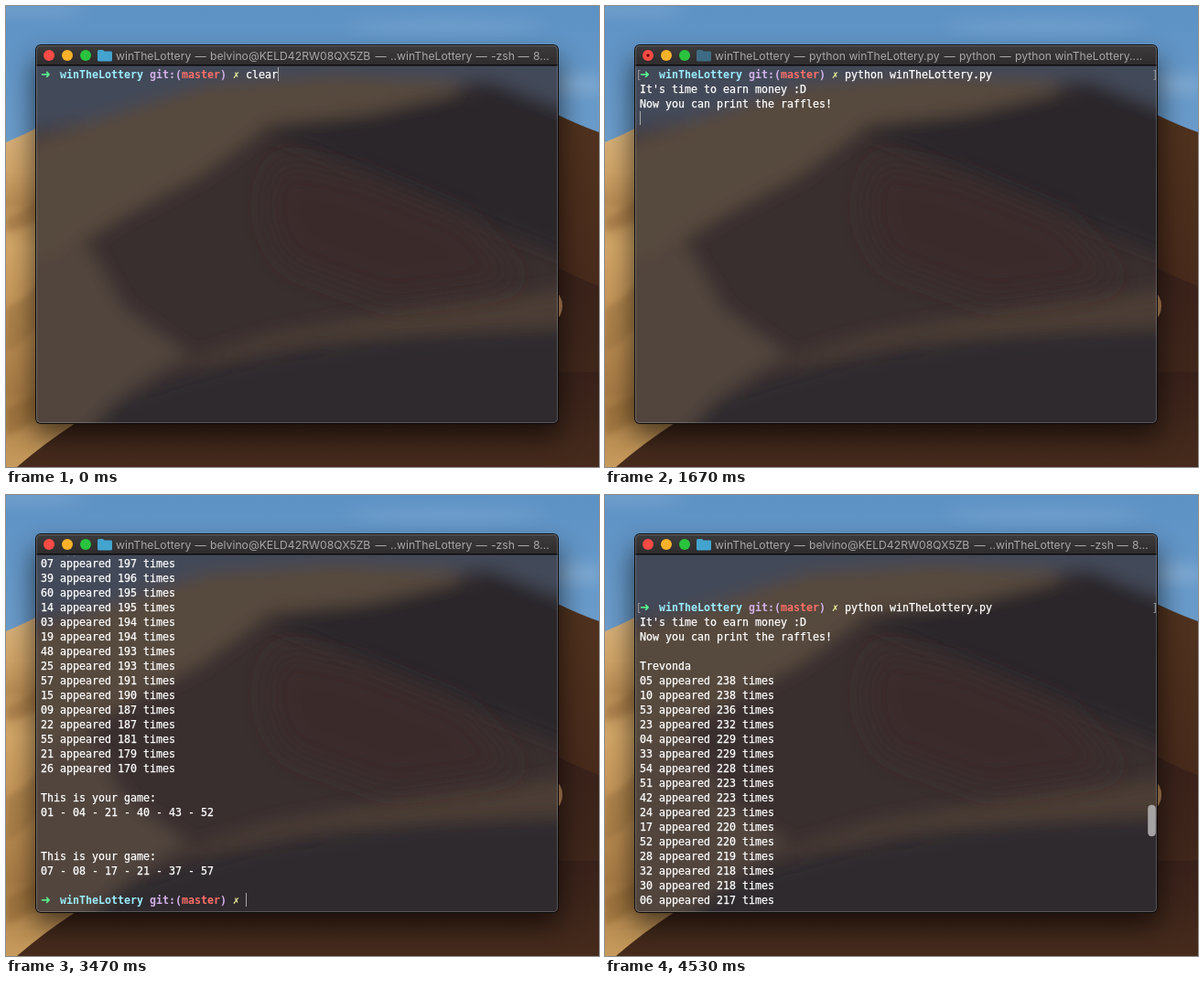
Recreate the animation shown at these times as an HTML page. Size 648 by 504 pixels, loop 4.59 s.

```html
<!DOCTYPE html>
<html lang="en">
<head>
<meta charset="utf-8">
<title>Terminal session</title>
<style>
  html, body { margin: 0; width: 100%; height: 100%; overflow: hidden; background: #2c1b14; }
  svg { display: block; width: 648px; height: 504px; }
  text { white-space: pre; }
  .mono { font: 11.63px "DejaVu Sans Mono", monospace; font-variant-ligatures: none; }
  .mono text { color: #fff; fill: currentColor; stroke: currentColor; stroke-width: .25px; }
  .mono .b { font-weight: bold; stroke-width: 0; }
  .mono .arrow { font: bold 13px "DejaVu Sans", sans-serif; }
  .mono .mark { color: #98989c; stroke-width: 0; }
  .title { font: 12.2px Inter, sans-serif; fill: #a8a7a8; }
</style>
</head>
<body>
<svg viewBox="0 0 648 504" xmlns="http://www.w3.org/2000/svg">
  <defs>
    <linearGradient id="sky" x2="0" y2="1">
      <stop offset="0" stop-color="#5d92c5"/><stop offset="1" stop-color="#8db5d9"/>
    </linearGradient>
    <linearGradient id="sand" x2="0" y2="1">
      <stop offset="0" stop-color="#dfc08f"/><stop offset=".22" stop-color="#d0a468"/>
      <stop offset=".3" stop-color="#b98d55"/><stop offset=".42" stop-color="#d3a667"/>
      <stop offset=".62" stop-color="#bf9054"/><stop offset=".8" stop-color="#a77b45"/>
      <stop offset="1" stop-color="#c79b5c"/>
    </linearGradient>
    <linearGradient id="shade" x2="0" y2="1">
      <stop offset="0" stop-color="#51341f"/><stop offset=".42" stop-color="#4a2c1c"/>
      <stop offset="1" stop-color="#3a2216"/>
    </linearGradient>
    <linearGradient id="low" x2="0" y2="1">
      <stop offset="0" stop-color="#38211a"/><stop offset="1" stop-color="#462b1c"/>
    </linearGradient>
    <linearGradient id="bar" x2="0" y2="1">
      <stop offset="0" stop-color="#3d3b3c"/><stop offset="1" stop-color="#2e2c2d"/>
    </linearGradient>
    <filter id="b3" x="-30%" y="-30%" width="160%" height="160%"><feGaussianBlur stdDeviation="3"/></filter>
    <filter id="b9" x="-30%" y="-50%" width="160%" height="200%"><feGaussianBlur stdDeviation="9"/></filter>
    <filter id="b15" x="-30%" y="-50%" width="160%" height="200%"><feGaussianBlur stdDeviation="15"/></filter>
    <clipPath id="frame"><rect x="33" y="43" width="570" height="413" rx="5"/></clipPath>
    <clipPath id="screen"><rect x="33" y="66" width="570" height="385"/></clipPath>
  </defs>

  <!-- desktop -->
  <rect width="648" height="504" fill="url(#sky)"/>
  <g fill="#fff" filter="url(#b9)">
    <ellipse cx="570" cy="86" rx="90" ry="12" opacity=".2"/>
    <ellipse cx="480" cy="22" rx="110" ry="7" opacity=".13"/>
    <ellipse cx="20" cy="2" rx="70" ry="6" opacity=".2"/>
  </g>
  <path d="M0 149Q20 141 40 130L300 90V504H0Z" fill="url(#sand)"/>
  <g filter="url(#b3)">
    <path d="M0 232Q18 226 40 208V232Q16 246 0 246Z" fill="#9d713f" opacity=".55"/>
    <path d="M0 330Q22 322 40 296V345Q16 372 0 378Z" fill="#98703f" opacity=".5"/>
    <path d="M0 440Q22 432 40 420V450Q20 462 0 470Z" fill="#87602f" opacity=".45"/>
  </g>
  <path d="M300 90H540L603 119Q628 131 648 138V504H300Z" fill="url(#shade)"/>
  <path d="M560 268L603 286Q628 299 648 306V504H560Z" fill="url(#low)"/>
  <path d="M12 504Q42 478 76 456L200 400H648V504Z" fill="url(#low)"/>
  <ellipse cx="600" cy="328" rx="8" ry="14" fill="#b98756"/>

  <!-- window -->
  <rect x="30" y="58" width="576" height="412" rx="8" filter="url(#b15)" opacity=".6"/>
  <rect x="32" y="42" width="572" height="415" rx="6" fill="#0c0a0a"/>
  <g clip-path="url(#frame)">
    <rect x="33" y="43" width="570" height="414" fill="#3a2f2f"/>
    <g filter="url(#b9)">
      <path d="M0 40H640V125L530 82 400 88 250 95 0 145Z" fill="#424a59"/>
      <path d="M0 155L120 118 220 86 360 76 490 82 500 96 400 118 290 130 215 185 130 230 0 310Z" fill="#574a3e"/>
      <path d="M275 133L400 118 500 94 530 84 640 125V285L540 245 430 200 340 160Z" fill="#2a2529"/>
      <path d="M0 290L90 260 130 330 200 380 130 425 80 480H0Z" fill="#51453c"/>
      <path d="M170 395L290 358 440 332 640 305V350L480 357 330 368 230 388Z" fill="#4c3e36"/>
      <path d="M80 475L120 432 190 405 300 380 430 362 640 352V500H80Z" fill="#2e2a2e"/>
    </g>
    <path d="M300 170Q270 230 310 280L420 320 560 300 500 235 390 190Z" fill="#3a2b2c" filter="url(#b15)"/>
    <rect x="33" y="43" width="570" height="21" fill="url(#bar)"/>
    <rect x="33" y="64" width="570" height="1.5" fill="#0d0c0d"/>
  </g>
  <rect x="33.5" y="43.5" width="569" height="412" rx="4.5" fill="none" stroke="#fff" stroke-opacity=".2"/>
  <circle cx="47" cy="54" r="6" fill="#fc4b45"/>
  <circle id="busy" cx="47" cy="54" r="1.8" fill="#640b08"/>
  <circle cx="67" cy="54" r="6" fill="#f8b229"/>
  <circle cx="87" cy="54" r="6" fill="#29c33e"/>
  <path id="folder" d="M100 49.5Q100 48 101.500 48H106L107.500 49.500H115Q116 49.500 116 51V59Q116 60.500 114.500 60.500H101.500Q100 60.500 100 59Z"/>
  <g id="titles" class="title"></g>
  <g clip-path="url(#screen)"><g id="rows" class="mono"></g></g>
  <rect id="cursor" width="1" height="15" fill="#a9a7a6"/>
  <rect id="thumb" x="593.500" width="8" height="34" rx="4" fill="#a5a3a4" stroke="#c4c2c3" stroke-opacity=".4"/>
</svg>
<script>
const LOOP = 4590, TICK = LOOP / 69, ROW = 16, COL = 7, LEFT = 38, ROWS = 24;
const $ = id => document.getElementById(id);
const svgNS = 'http://www.w3.org/2000/svg';

function add(parent, tag, attrs = {}, content = '') {
  const el = document.createElementNS(svgNS, tag);
  for (const k in attrs) el.setAttribute(k, attrs[k]);
  el.textContent = content;
  return parent.appendChild(el);
}

// Title bar, one caption for the shell and one for the running script
function caption(parts) {
  const g = add($('titles'), 'g');
  for (const [x, str] of parts) {
    add(g, 'text', { x, y: 59 }, str);
    if (x > 120) add(g, 'text', { x: x - 16.5 }, '—').setAttribute('y', 59);
  }
  return g;
}
const shellTitle = caption([[120, 'winTheLottery'], [223, 'belvino@KELD42RW08QX5ZB'],
  [420, '..winTheLottery'], [530, '-zsh'], [576, '8...']]);
const runTitle = caption([[120, 'winTheLottery'], [223, 'python winTheLottery.py'],
  [387, 'python'], [448, 'python winTheLottery....']]);

// Session text: ball numbers grouped by how often they were drawn
const draws = `238:05 10|236:53|232:23|229:04 33|228:54|223:51 42 24|220:17 52|219:28|218:32 30|
217:06 37|216:43|215:56 13 34 36|214:27|213:29 41 16 50|212:02|211:44|210:35 18|207:08|
206:01 59 12|205:45 38|204:58|203:47|202:49|201:20|200:31 46|199:11|198:40|197:07|196:39|
195:60 14|194:03 19|193:48 25|191:57|190:15|187:09 22|181:55|179:21|170:26`;
const tally = draws.replace(/\n/g, '').split('|').flatMap(group => {
  const [count, balls] = group.split(':');
  return balls.split(' ').map(ball => `${ball} appeared ${count} times`);
});
const PROMPT = null;
const lines = [PROMPT, "It's time to earn money :D", 'Now you can print the raffles!', '', 'Trevonda',
  ...tally, '', 'This is your game:', '01 - 04 - 21 - 40 - 43 - 52', '', '',
  'This is your game:', '07 - 08 - 17 - 21 - 37 - 57', '', PROMPT];

const promptParts = [[0, '➜', '#5af78e', 'b arrow'], [3, 'winTheLottery', '#9aedfe', 'b'],
  [17, 'git:(', '#d3b1ea', 'b'], [22, 'master', '#ff6e67', 'b'],
  [28, ')', '#d3b1ea', 'b'], [30, '✗', '#f4f99d', 'b']];

const rows = lines.map((line, i) => {
  const g = add($('rows'), 'g', { transform: `translate(${LEFT} ${79 + i * ROW})` });
  if (line !== PROMPT) add(g, 'text', {}, line);
  else for (const [col, str, color, cls] of promptParts)
    add(g, 'text', { x: col * COL, class: cls, style: `color:${color}` }, str);
  return g;
});
const command = add(rows[0], 'text', { x: 32 * COL });
const marks = [[-4.5, '['], [559.5, ']']].map(([x, s]) => add(rows[0], 'text', { x, class: 'mark' }, s));

// [tick, lines printed so far]
const printed = [[0, 1], [12, 2], [13, 3], [43, 65], [45, 69], [47, 74]];
// [tick, first visible line]
const scroll = [[53, 50], [61, 21], [67, -3]];
const RUN = 11, DONE = 47, script = 'python winTheLottery.py';

function lerpTable(table, n) {
  const last = table.length - 1;
  if (n >= table[last][0]) return table[last][1];
  const i = table.findIndex(([at]) => at > n);
  const [a, va] = table[i - 1], [b, vb] = table[i];
  return Math.round(va + (vb - va) * (n - a) / (b - a));
}

const show = (el, on) => el.setAttribute('visibility', on ? 'visible' : 'hidden');

function typed(n) {
  if (n < 1) return 'clear';
  return script.slice(0, Math.max(0, Math.ceil((n - 2) / 8 * script.length)));
}

function draw(n) {
  const count = printed.filter(([at]) => at <= n).pop()[1];
  const scrolling = n > scroll[0][0];
  const top = scrolling ? lerpTable(scroll, n) : Math.max(0, count - ROWS);
  const running = n >= RUN && n < DONE;
  const text = typed(n);

  command.textContent = text;
  rows.forEach((row, i) => show(row, i < count));
  marks.forEach(m => show(m, n >= RUN));
  $('rows').setAttribute('transform', `translate(0 ${-top * ROW})`);

  show(shellTitle, !running);
  show(runTitle, running);
  show($('busy'), running);
  $('folder').setAttribute('fill', running ? '#3d6b83' : '#43a4cf');

  const live = n < RUN ? [32 + text.length, 0] : running ? [0, count] : [32, count - 1];
  $('cursor').setAttribute('x', LEFT + live[0] * COL);
  $('cursor').setAttribute('y', 67 + Math.min(live[1] - top, ROWS - 1) * ROW);
  show($('cursor'), !scrolling);
  $('thumb').setAttribute('y', 343.6 + 1.54 * top);
  show($('thumb'), scrolling);
}

const start = performance.now();
let shown = -1;
function frame() {
  const t = (performance.now() - start) % LOOP;
  const n = Math.min(68, Math.floor((t + 4) / TICK));
  if (n !== shown) draw(shown = n);
  requestAnimationFrame(frame);
}
frame();
</script>
</body>
</html>
```
